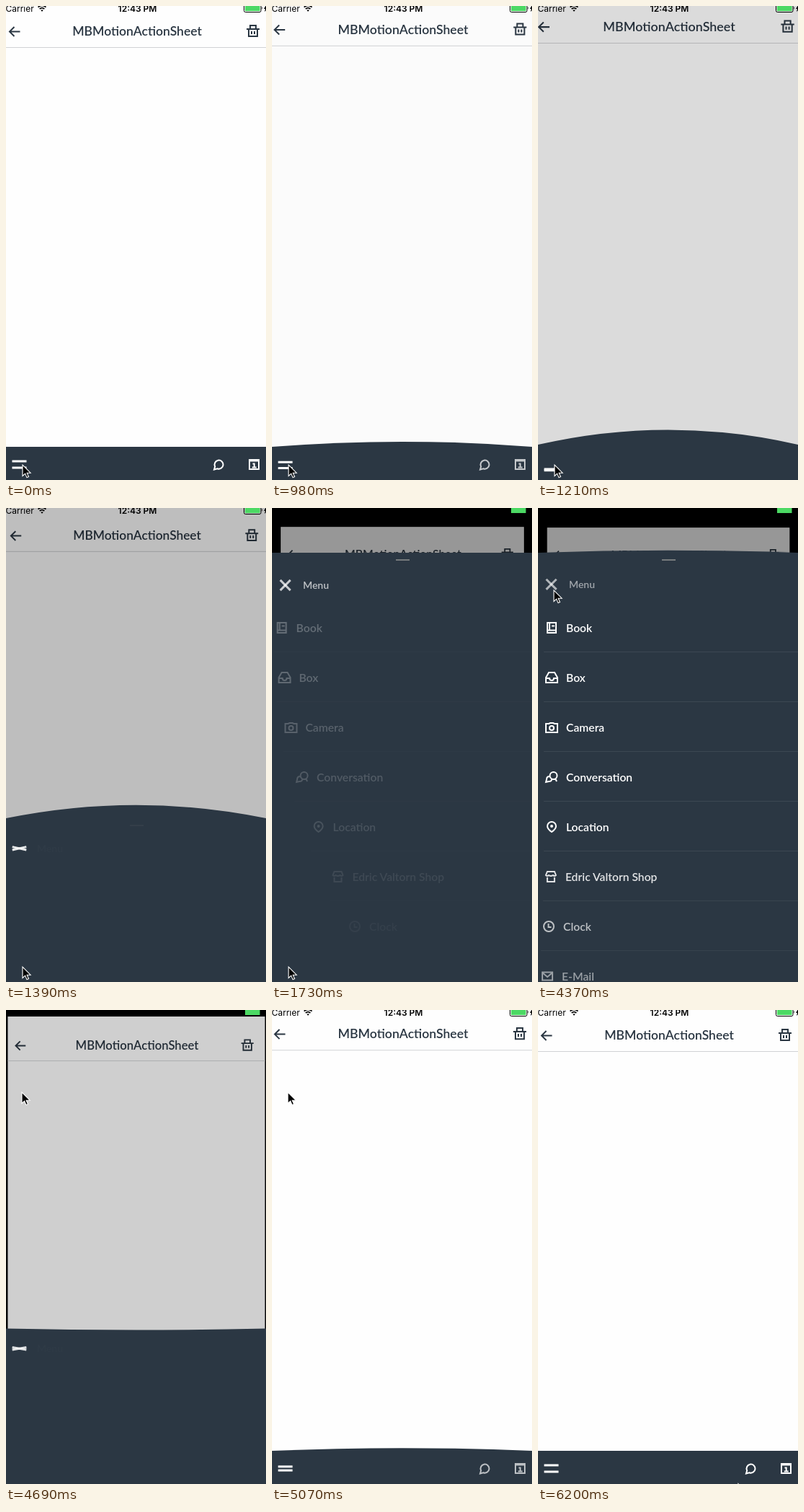
An HTML page for the animation above (7.73 s loop, 361 px wide and 657 px high).

```html
<!DOCTYPE html>
<html lang="en">
<head>
<meta charset="utf-8">
<title>Motion action sheet</title>
<style>
  html, body { margin: 0; width: 100%; height: 100%; overflow: hidden; background: #000; }
  svg { display: block; width: 361px; height: 657px; }
  text { font-family: Lato, sans-serif; font-weight: 600; }
  .status text { font-family: Inter, sans-serif; font-size: 12px; font-weight: 400; }
  .status .time { font-weight: 600; text-anchor: middle; }
  .line { fill: none; stroke-width: 2; }
  .dark { stroke: #2b3743; }
  .light { stroke: #fff; }
</style>
</head>
<body>
<svg viewBox="0 0 361 657">
  <rect width="361" height="657"/>
  <g id="view">
    <rect x="-6.5" y="-7" width="375" height="667" fill="#fefefe"/>
    <path d="M-6.5 57.5h375" stroke="#d0d2d4"/>
    <path class="line dark" d="M19.500 35.500H5m6.500-6.500L5 35.500l6.500 6.500"/>
    <text x="182" y="41" text-anchor="middle" font-size="17.500" fill="#2b3743">MBMotionActionSheet</text>
    <path class="line dark" d="M334 32h18m-15 0v10h12V32m-10-1v-4h8v4m-6 4v4m4-4v4"/>
    <rect id="dim" x="-6.5" y="-7" width="375" height="667"/>
  </g>
  <g class="status">
    <text x="-.5" y="7.500">Carrier</text>
    <text class="time" x="182.500" y="7.500">12:43 PM</text>
    <path d="M44.500 1.700q5.500-4.600 11 0M46.700 4q3.300-2.700 6.600 0" fill="none" stroke="#000" stroke-width="1.700"/>
    <path d="M48.200 5.800q1.800-1.300 3.600 0L50 7.800z"/>
    <rect x="330.500" y="-3.500" width="23.500" height="12" rx="2" fill="none" stroke="#000"/>
    <rect x="332" y="-2" width="20.500" height="9" fill="#4cd964"/>
    <path d="M355 1q1.500 1.500 0 4zM361-1l-3 5h2l-1 4 2-2z"/>
  </g>
  <path id="sheet" fill="#2b3743"/>
  <g id="tools">
    <path class="line light" d="M290 31.200l-1 .3 1.200-4.200a6 6 0 1 1 3.200 2.900z"/>
    <path class="line light" d="M338 18h13v13h-13zm-1 1.500h15m-9.500 4h2.200v5m-3 0h6"/>
  </g>
  <g id="rows"></g>
  <path id="grip" d="M172 0h19" stroke="#767a7c" stroke-width="2"/>
  <g id="head">
    <g class="light" stroke-width="3">
      <path class="bar" d="M-10 0h20"/>
      <path class="bar" d="M-10 0h20"/>
    </g>
    <text id="menu" x="43" y="5" font-size="14" fill="#fff">Menu</text>
  </g>
  <path id="cursor" d="M0 0v15.500l3.600-3.400 2.400 5.500 2.500-1.100-2.400-5.300h5z" stroke="#fff" stroke-width="1.100"/>
</svg>
<script>
const LOOP = 7730, STEP = 76, OPENING = 980 - STEP, CLOSING = 4370 - STEP;

// Cursor moves: start, end, x, y, sideways bend
const hops = [[2550, 3020, 48, 255, 38], [3260, 3770, 22, 114, 0],
              [5150, 5620, 230, 496, 0], [5860, 6200, 279, 660, 0]];
const bursts = [[980, 1730], [1790, 2260], [4370, 5070], ...hops];

const box = (x, y, w, h) => `M${x} ${y}h${w}v${h}h${-w}z`;
const ring = (x, y, r) => `M${x - r} ${y}a${r} ${r} 0 1 1 ${2 * r} 0a${r} ${r} 0 1 1 ${-2 * r} 0z`;

const items = [
  ['Book', box(-6, -7, 12, 14) + 'M-3-7V3M-6 3.500H6M0-2.500h4'],
  ['Box', 'M-8 7V0l4-7h8l4 7v7zM-8 1h5q0 3 3 3t3-3h5'],
  ['Camera', 'M-8-5h4l2-1h4l2 1h4V7h-16z' + ring(0, 1, 3)],
  ['Conversation', ring(2.5, -2, 5) + 'M5 2l2 4M-3-1q-4 0-4 4l-1 4 4-1q4 0 4-3'],
  ['Location', 'M0 7Q-6 3-6-1a6 6 0 0 1 12 0Q6 3 0 7z' + ring(0, -1, 1)],
  ['Edric Valtorn Shop', 'M-5-7H5l2 5q-2 2-4 0-3 2-6 0-2 2-4 0zM-5 1v6H5V1'],
  ['Clock', ring(0, 0, 7) + 'M-.5-4v5h4'],
  ['E-Mail', box(-7, -5.5, 14, 11) + 'M-7-5l7 6 7-6']
];

const $ = id => document.getElementById(id);
const set = (el, name, value) => el.setAttribute(name, value);
const move = (el, x, y, extra = '') => set(el, 'transform', `translate(${x} ${y}) ${extra}`);
const clamp = x => Math.min(1, Math.max(0, x));
const mix = (a, b, k) => a + (b - a) * k;
const wave = (x, halves) => Math.sin(Math.PI * halves * clamp(x));

function ramp(t, a, b) {
  const x = clamp((t - a) / (b - a));
  return x * x * (3 - 2 * x);
}

$('rows').innerHTML = items.map(([name, icon]) => `<g>
  <path class="line light" d="${icon}" transform="translate(19 0)"/>
  <text x="39" y="5.800" font-size="15.700" fill="#fff">${name}</text>
  <path d="M8 33.500h460" stroke="#fff" stroke-opacity=".08"/></g>`).join('');
const rows = [...$('rows').children];
const bars = document.querySelectorAll('.bar');

// The picture advances in steps during a burst and rests after it
function snap(t) {
  return Math.max(0, ...bursts.filter(([a]) => t >= a)
    .map(([a, b]) => Math.min(b, a + Math.floor((t - a) / STEP) * STEP)));
}

function placeRow(row, i, open, close, top) {
  const u = Math.max(0, open - 478 - 42 * i), a = u / 100;
  const spring = 103 * Math.exp(-.9 * a) * (Math.cos(a) + .9 * Math.sin(a));
  const p = clamp((close - 27 * (7 - i)) / 190);
  const back = 60 * p * p * (2.7 * p - 1.7);
  const enter = 1 - (1 - clamp(u / 346)) ** 1.5;
  move(row, spring + back, top + 104 + 69 * i);
  set(row, 'opacity', enter * clamp((open - 556) / 690) * clamp(1 - 1.2 * p));
}

function placeCursor(t) {
  let x = 23, y = 636;
  for (const [a, b, toX, toY, bend] of hops) {
    const s = ramp(t, a - STEP, b);
    x = mix(x, toX, s) + bend * wave(s, 1);
    y = mix(y, toY, s);
  }
  move($('cursor'), x, y);
}

function draw(time) {
  const t = snap(time), open = t - OPENING, close = t - CLOSING;
  // 0 to 1 while opening, back to 0 while closing
  const shown = (a, b, c, d) => ramp(open, a, b) - ramp(close, c, d);

  const top = mix(611, 62, shown(285, 730, 90, 550));
  const hump = 21 * wave(open / 690, 1) + 5 * wave(close / 1000, 3);
  const scale = 1 - .1 * shown(300, 770, 60, 650)
    + .022 * wave(open / 600, 1) - .0065 * wave(close / 1000, 2);

  set($('view'), 'transform', `translate(181 326.5) scale(${scale}) translate(-181 -326.5)`);
  set($('dim'), 'opacity', .41 * shown(0, 780, 60, 660));
  set($('sheet'), 'd', `M0 ${top}Q180.500 ${top - 2 * hump} 361 ${top}V657H0z`);

  move($('tools'), 0, top);
  set($('tools'), 'opacity', 1 - shown(0, 220, 560, 880));
  move($('grip'), 0, top + 10);
  set($('grip'), 'opacity', shown(390, 690, 110, 360));

  move($('head'), 0, top + 24.5 + 20.5 * shown(0, 610, 0, 510));
  const glow = 1 + .3 * wave((open - 556) / 690, 1);
  set($('menu'), 'opacity', .56 * glow * shown(420, 770, 50, 410));

  const gap = 4.5 * (1 - shown(0, 430, 510, 960));
  const turn = 45 * shown(330, 690, 90, 510);
  bars.forEach((bar, i) => {
    const side = 2 * i - 1;
    move(bar, 18.5, side * gap, `rotate(${side * turn})`);
    set(bar, 'opacity', 1 - .37 * shown(0, 1240, 110, 610));
  });

  rows.forEach((row, i) => placeRow(row, i, open, close, top));
  placeCursor(t);
}

let start;
function tick(now) {
  start ??= now;
  draw((now - start) % LOOP);
  requestAnimationFrame(tick);
}
draw(0);
requestAnimationFrame(tick);
</script>
</body>
</html>
```
